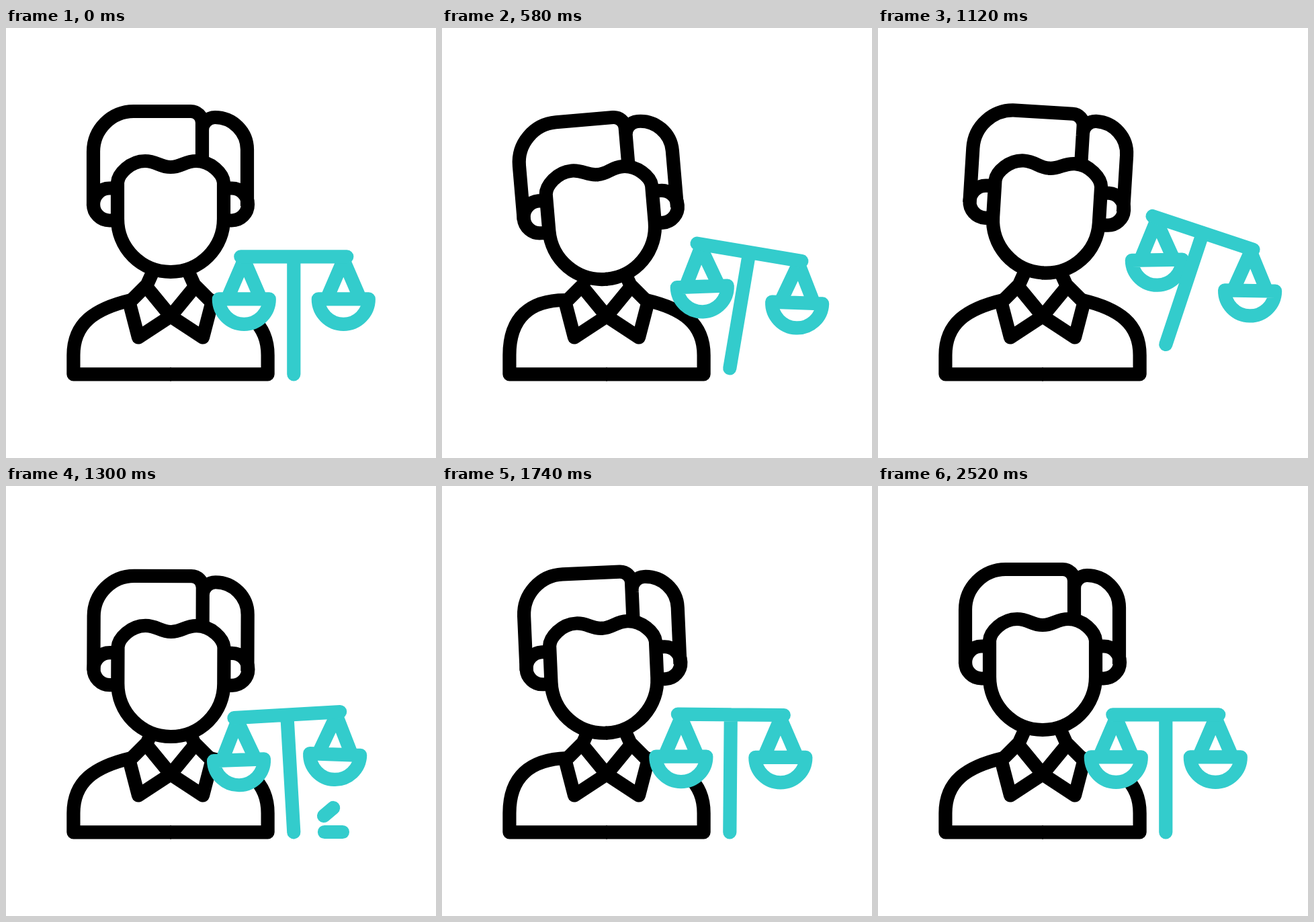
Recreate the animation shown at these times as an HTML page with a canvas. Size 640 by 640 pixels, loop 2620 ms.

```html
<!DOCTYPE html>
<html lang="en">
<head>
<meta charset="utf-8">
<title>Lawyer with scales</title>
<style>
  html, body { margin: 0; width: 100%; height: 100%; overflow: hidden; background: #fff; }
  canvas { display: block; width: 640px; height: 640px; }
</style>
</head>
<body>
<canvas id="stage" width="640" height="640"></canvas>
<script>
const ctx = document.getElementById('stage').getContext('2d');
const LOOP = 2620, STEP = 20, LAST = 2520;
const BLACK = '#000', TEAL = '#33cccc';
const AXIS = 245;

// Sine ease from 0 to 1 between two times.
function ease(t, from, to) {
  const p = Math.max(0, Math.min(1, (t - from) / (to - from)));
  return (1 - Math.cos(Math.PI * p)) / 2;
}

// Value that starts at 0 and eases through a few [time, value] turning points.
function glide(t, start, ...turns) {
  let value = 0, from = start;
  for (const [to, target] of turns) {
    value += (target - value) * ease(t, from, to);
    if (t < to) break;
    from = to;
  }
  return value;
}

const headTilt = t => glide(t, 0, [530, -5.1], [1030, 4], [1580, -3.8], [2140, 3], [LAST, 0]);
const headDrop = t => glide(t, 0, [540, 11], [940, 0], [1060, 0], [1300, 10], [1500, 10], [1960, 0]);
const shoulderLift = t => glide(t, 0, [560, 1], [1040, 0], [1300, 0], [1600, 1], [2080, 0]);
const scaleTilt = t => glide(t, 0, [1130, 18.4], [1250, -3.5], [1600, 0.9], [1900, 0]);
const scaleRise = t => glide(t, 360, [1110, -45], [1240, 0]);
const panSwing = t => t < 220 || t > 1660 ? 0 : 1 - Math.cos(2 * Math.PI * (t - 220) / 720);

const HAIR = new Path2D(`
  M130 265 V184 A60 60 0 0 1 190 124 H275 A17 17 0 0 1 292 141 V196
  M292 155 V152 A19 19 0 0 1 311 133 A48 48 0 0 1 359 181 V265`);
const HALF_FACE = new Path2D(`
  M246 207 H245 C229 207 224 198 207 198 C185 198 167 217 166 230
  V284 A79 79 0 0 0 245 363 H246
  M166 238.5 H154 A24 24 0 0 0 154 286.5 H166`);
const HALF_COLLAR = new Path2D('M245 429 L208 384 L183.5 408.5 L197 460.5 Z M218 364 L209 384');
const POST = new Path2D('M-79 -175 H79 M0 -175 V0');
const PAN = new Path2D('M-25 66 L0 8 L25 66 Z M-37.5 66 A37.5 37.5 0 0 0 37.5 66 Z');

function placed(x, y, deg, paint) {
  ctx.save();
  ctx.translate(x, y);
  ctx.rotate(deg * Math.PI / 180);
  paint();
  ctx.restore();
}

function mirrored(paint) {
  for (const side of [-1, 1]) {
    ctx.save();
    if (side > 0) {
      ctx.translate(2 * AXIS, 0);
      ctx.scale(-1, 1);
    }
    paint(side);
    ctx.restore();
  }
}

function drawBody(t) {
  mirrored(side => {
    const lift = side < 0 ? shoulderLift(t) : 0;
    ctx.stroke(new Path2D(`M246 515.3 H100.4 V487
      C100.4 ${440 - 9 * lift} 131 ${418 - 14 * lift} 186 405`));
    ctx.stroke(HALF_COLLAR);
  });
}

function drawHead(t) {
  const neck = 366;
  placed(AXIS, neck + headDrop(t), headTilt(t), () => {
    ctx.translate(-AXIS, -neck);
    ctx.stroke(HAIR);
    mirrored(() => ctx.stroke(HALF_FACE));
  });
}

function drawScales(t) {
  const tilt = scaleTilt(t), swing = panSwing(t);
  placed(428.3, 515.3 + scaleRise(t), tilt, () => {
    for (const side of [-1, 1]) {
      placed(side * 72.5, -178, side * swing - tilt, () => {
        ctx.translate(side * 1.5, 0);
        ctx.fill(PAN);
        ctx.stroke(PAN);
      });
    }
    ctx.stroke(POST);
  });
}

function drawSparks(t) {
  const tip = ease(t, 1230, 1340), tail = ease(t, 1320, 1460);
  if (tip <= tail) return;
  const spark = (x, y, dx, dy) => {
    ctx.beginPath();
    ctx.moveTo(x + dx * tail, y + dy * tail);
    ctx.lineTo(x + dx * tip, y + dy * tip);
    ctx.stroke();
  };
  spark(473, 491, 20, -17);
  spark(474, 515, 38, 0);
}

function draw(t) {
  ctx.fillStyle = '#fff';
  ctx.fillRect(0, 0, 640, 640);
  ctx.lineWidth = 20.2;
  ctx.lineJoin = 'round';
  ctx.lineCap = 'butt';
  ctx.strokeStyle = BLACK;
  drawBody(t);
  drawHead(t);
  ctx.lineCap = 'round';
  ctx.strokeStyle = TEAL;
  drawScales(t);
  drawSparks(t);
}

const start = performance.now();
function tick() {
  const t = (performance.now() - start) % LOOP;
  draw(Math.min(LAST, Math.floor(t / STEP) * STEP));
  requestAnimationFrame(tick);
}
tick();
</script>
</body>
</html>
```
